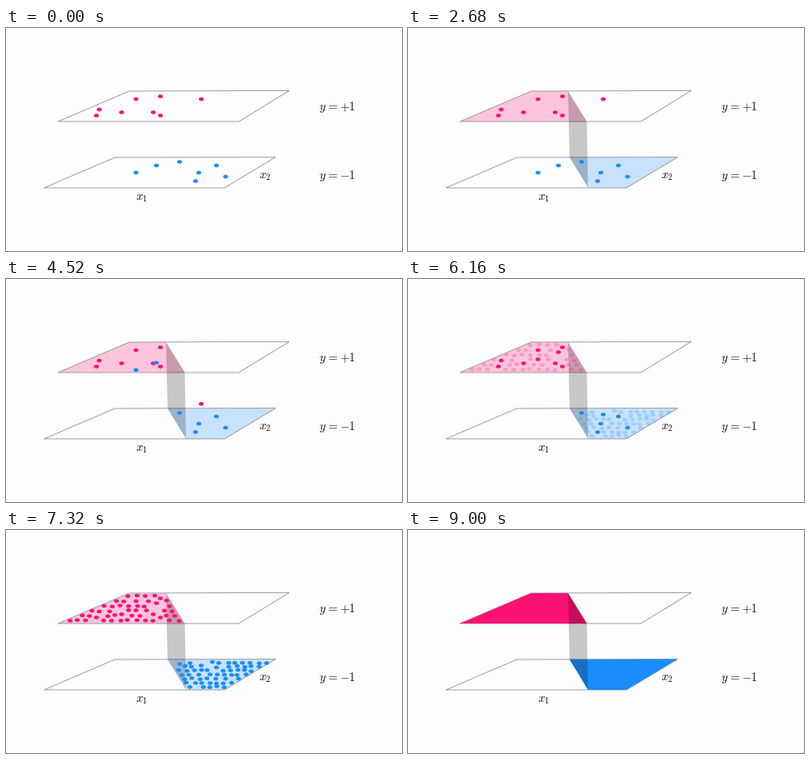
Animation, 495 px wide and 279 px high, one loop 9.04 s. Source, as a matplotlib script:

```python
import numpy as np
import matplotlib.pyplot as plt
from matplotlib.animation import FuncAnimation
from matplotlib.collections import EllipseCollection
from matplotlib.colors import to_rgb
from matplotlib.patches import Polygon

W, H, DPI = 495, 279, 100
STEP, FRAMES = 40, 226
PINK, BLUE = np.array(to_rgb("#fb1272")), np.array(to_rgb("#1a8cfb"))

plt.rcParams["mathtext.fontset"] = "cm"
fig = plt.figure(figsize=(W / DPI, H / DPI), dpi=DPI, facecolor="#fdfcfe")
ax = fig.add_axes([0, 0, 1, 1])
ax.axis("off")

UPPER = [(65, 117), (154, 79), (354, 78.4), (291, 117)]
LOWER = [(47.5, 200), (136, 162), (337, 161.6), (273, 200)]
UPPER_PART = [(65, 117), (154, 79), (200, 79), (223.5, 117)]
LOWER_PART = [(202, 162), (337, 161.6), (273, 200), (225, 200)]
WALL = [(200, 79), (223.5, 117), (225, 199), (202, 162)]

# Dots that stay, then dots that change sheets
PINK_FIXED = [(116.5, 102), (113, 109.5), (144.5, 105.5), (162.5, 89),
              (193, 85.5), (184, 105.5), (193, 109.5)]
BLUE_FIXED = [(217, 167.5), (263, 172), (241, 181), (237, 191.5), (274.5, 186)]
PINK_MOVING = [(244, 89)]
BLUE_MOVING = [(162.5, 181), (188, 172)]
SHIFT = 80.5


def ramp(t, start, end):
    return float(np.clip((t - start) / (end - start), 0, 1))


def ease(t, start, end):
    return 0.5 - 0.5 * np.cos(np.pi * ramp(t, start, end))


def add_poly(points, **kw):
    return ax.add_patch(Polygon(points, closed=True, **kw))


def scatter_region(rng, part, taken, rows, gap):
    """Jittered rows of dots inside a trapezoid, clear of the taken spots."""
    if part is UPPER_PART:
        left, right = (part[1], part[0]), (part[2], part[3])
    else:
        left, right = (part[0], part[3]), (part[1], part[2])
    dots = []
    for v in np.linspace(0.1, 0.9, rows):
        xa = left[0][0] + v * (left[1][0] - left[0][0]) + 6
        xb = right[0][0] + v * (right[1][0] - right[0][0]) - 6
        y = left[0][1] + v * (left[1][1] - left[0][1])
        for x in np.linspace(xa, xb, max(2, round((xb - xa) / gap) + 1)):
            px, py = x + rng.uniform(-1.5, 1.5), y + rng.uniform(-0.9, 0.9)
            if all(np.hypot((px - a) / 7.5, (py - b) / 5) > 1 for a, b in taken):
                dots.append((px, py))
    return np.array(dots)


def add_dots(points, zorder):
    n = len(points)
    dots = EllipseCollection(np.full(n, 6.2), np.full(n, 4.6), np.zeros(n),
                             units="xy", offsets=points,
                             offset_transform=ax.transData,
                             linewidths=0, zorder=zorder)
    return ax.add_collection(dots)


def colours(colour, alphas):
    return np.column_stack([np.tile(colour, (len(alphas), 1)), alphas])


class Sheet:
    """One class: tinted region, its dots and the solid colour sweep."""

    def __init__(self, outline, part, colour, fixed, moving, arriving,
                 direction, rows, gap, seed):
        self.colour, self.direction = colour, direction
        self.fixed = np.array(fixed)
        self.start = np.array(moving)
        xs = [p[0] for p in part]
        self.near, self.far = (max(xs), min(xs)) if direction < 0 else (min(xs), max(xs))
        add_poly(outline, fill=False, ec="#8c8c8c", lw=0.6, zorder=1.5)
        self.tint = add_poly(part, fc=colour, lw=0, zorder=0.5)
        clip = add_poly(part, fc="none", lw=0)
        x0, x1 = min(xs) - 2, max(xs) + 2
        self.grid = np.linspace(x0, x1, 300)
        self.solid = ax.imshow(np.zeros((1, 300, 4)), aspect="auto", zorder=2,
                               extent=(x0, x1, part[2][1] + 60, part[2][1] - 60),
                               interpolation="nearest")
        self.solid.set_clip_path(clip)
        self.crowd = scatter_region(np.random.default_rng(seed), part,
                                    fixed + arriving, rows, gap)
        self.crowd_dots = add_dots(self.crowd, 4)
        self.fixed_dots = add_dots(self.fixed, 5)
        self.moving_dots = add_dots(self.start, 6)

    def cover(self, x, t):
        """Opacity of the solid colour at x."""
        edge = self.near + (self.far - self.near) * ramp(t, 7400, 8760)
        edge += self.direction * (24 * ramp(t, 7400, 8760) - 12)
        return np.clip(0.5 + self.direction * (edge - x) / 14, 0, 1)

    def update(self, t, other):
        self.tint.set_alpha(0.23 * ease(t, 1720, 2600))
        alpha = self.cover(self.grid, t) if t >= 7400 else np.zeros(300)
        self.solid.set_data(colours(self.colour, alpha)[None])

        def left_over(x):
            return 1 - self.cover(x, t) if t >= 7400 else np.ones(len(x))

        self.crowd_dots.set_facecolors(
            colours(self.colour, left_over(self.crowd[:, 0]) * ramp(t, 5900, 7000)))
        self.fixed_dots.set_facecolors(
            colours(self.colour, left_over(self.fixed[:, 0])))

        pos = self.start.astype(float)
        sign = 1 if self.direction < 0 else -1
        pos[:, 1] += sign * SHIFT * ease(t, 2760, 5160)
        self.moving_dots.set_offsets(pos)
        mix = ramp(t, 5360, 5760)
        blend = (1 - mix) * self.colour + mix * other.colour
        x = pos[:, 0]
        alpha = 1 - other.cover(x, t) if t >= 7400 else np.ones(len(x))
        self.moving_dots.set_facecolors(colours(blend, alpha))


def moved(points, dy):
    return [(x, y + dy) for x, y in points]


upper = Sheet(UPPER, UPPER_PART, PINK, PINK_FIXED, PINK_MOVING,
              moved(BLUE_MOVING, -SHIFT), -1, 6, 10.5, 4)
lower = Sheet(LOWER, LOWER_PART, BLUE, BLUE_FIXED, BLUE_MOVING,
              moved(PINK_MOVING, SHIFT), 1, 7, 9.2, 9)
wall = add_poly(WALL, fc="black", lw=0, zorder=3)

EQUALS = r"\hspace{0.078}=\hspace{0.078}"
for x, y, label in [(391, 102.5, f"$y{EQUALS}{{+}}1$"),
                    (391, 188.5, f"$y{EQUALS}{{-}}1$"),
                    (162.5, 215, "$x_1$"), (316, 188, "$x_2$")]:
    ax.text(x, y, label, fontsize=15 * 72 / DPI, color="#111111", va="baseline")

ax.set_xlim(0, W)
ax.set_ylim(H, 0)


def draw(i):
    t = i * STEP
    wall.set_alpha(0.21 * ease(t, 1720, 2600))
    upper.update(t, lower)
    lower.update(t, upper)
    return []


anim = FuncAnimation(fig, draw, frames=FRAMES, interval=STEP, repeat=True,
                     repeat_delay=0, blit=False)
plt.show()
```
